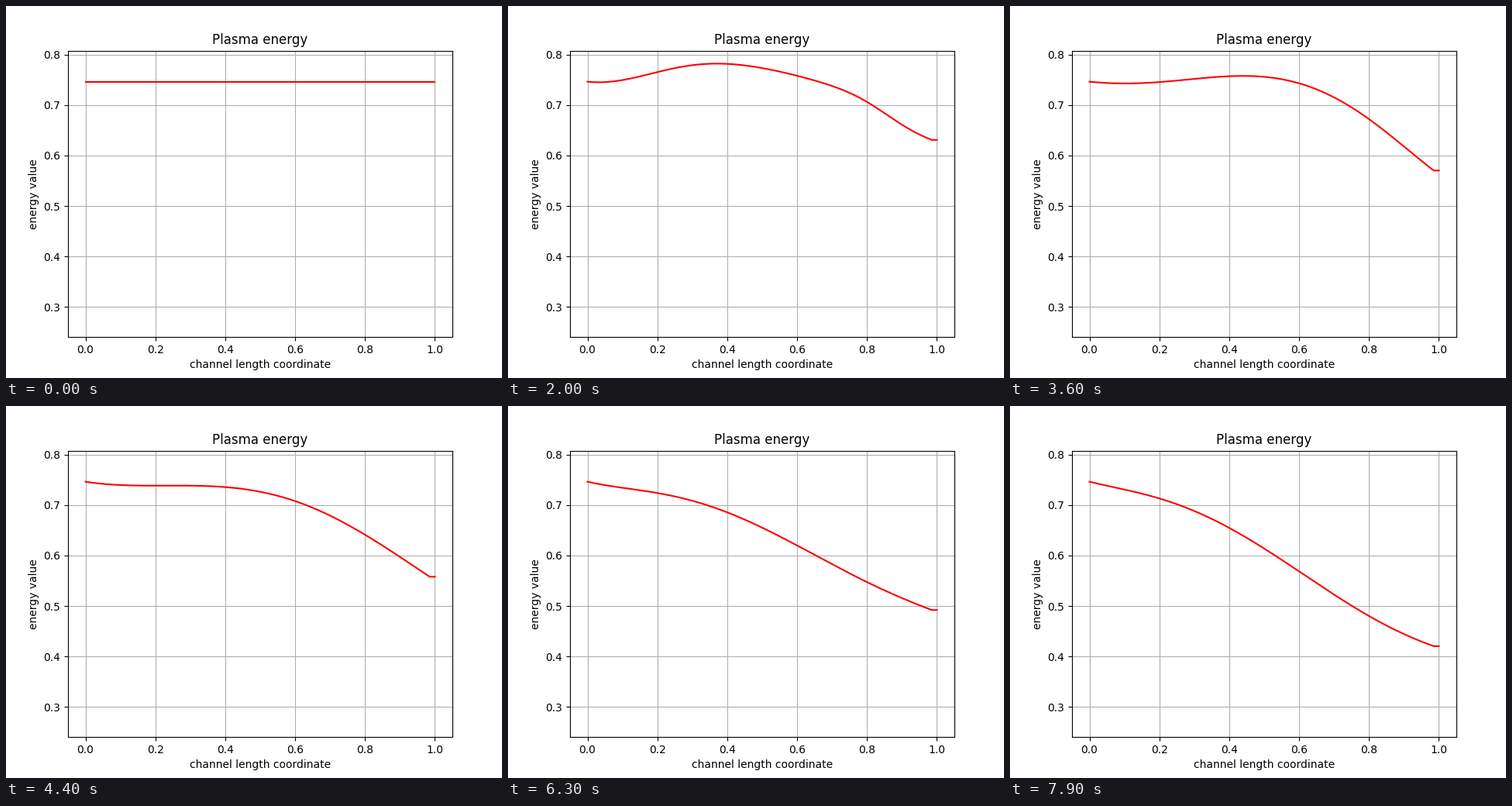
Write a matplotlib script that moves like this. It is 640x480 px and loops after 8 s.

```python
import numpy as np
import matplotlib.pyplot as plt
from matplotlib.animation import FuncAnimation

FRAMES, INTERVAL = 80, 100
BASE = 0.7466
x = np.linspace(0, 1, 201)
xc = np.minimum(x, .985)  # zero gradient at the outlet

# Waves run inward from both ends until they meet
START, MEET = .8, 2.0

# Energy at a few places once the waves have passed each other
KEYS = [0, .1, .3, .6, .85, .985]
LATE = {
    3.6: [BASE, .7432, .7522, .7434, .6461, .5703],
    5.2: [BASE, .7372, .7257, .6665, .5876, .5429],
    6.3: [BASE, .7346, .7088, .6200, .5309, .4920],
    7.9: [BASE, .7311, .6885, .5685, .4611, .4202],
}


def waves(t):
    """Sloping bulk flow plus one growing wave at each end."""
    def grow(a, b):
        return np.interp(t, [0, START, MEET], [0, a, b])

    inlet, outlet = grow(.0375, .0894), grow(.027, .041)
    slope, bend = grow(.0742, .068), grow(.02, -.1)
    reach_in = max(grow(.135, .275), 1e-6)
    reach_out = max(grow(.096, .18), 1e-6)
    return (BASE - slope * xc + bend * xc ** 2
            + inlet * (1 - np.exp(-(xc / reach_in) ** 2))
            - outlet * np.exp(-((1 - xc) / reach_out) ** 2.5))


def settled(values):
    return np.polyval(np.polyfit(KEYS, values, len(KEYS) - 1), xc)


TIMES = np.array([START, MEET, *LATE])
PROFILES = np.array([waves(START), waves(MEET), *map(settled, LATE.values())])
RATES = np.gradient(PROFILES, TIMES, axis=0)


def energy(t):
    if t < MEET:
        return waves(t)
    # Cubic Hermite step between profiles
    i = min(np.searchsorted(TIMES, t, side="right") - 1, len(TIMES) - 2)
    h = TIMES[i + 1] - TIMES[i]
    s = (t - TIMES[i]) / h
    ease = s * s * (3 - 2 * s)
    return (PROFILES[i] * (1 - ease) + PROFILES[i + 1] * ease
            + h * s * (1 - s) * (RATES[i] * (1 - s) - RATES[i + 1] * s))


fig, ax = plt.subplots(figsize=(6.4, 4.8), dpi=100)
ax.set(xlim=(-.05, 1.05), ylim=(.2397, .8083), title="Plasma energy",
       xlabel="channel length coordinate", ylabel="energy value")
ax.grid()
line, = ax.plot(x, energy(0), color="red")


def update(frame):
    line.set_ydata(energy(frame * INTERVAL / 1000))
    return line,


anim = FuncAnimation(fig, update, frames=FRAMES, interval=INTERVAL,
                     repeat=True, repeat_delay=0)
plt.show()
```
